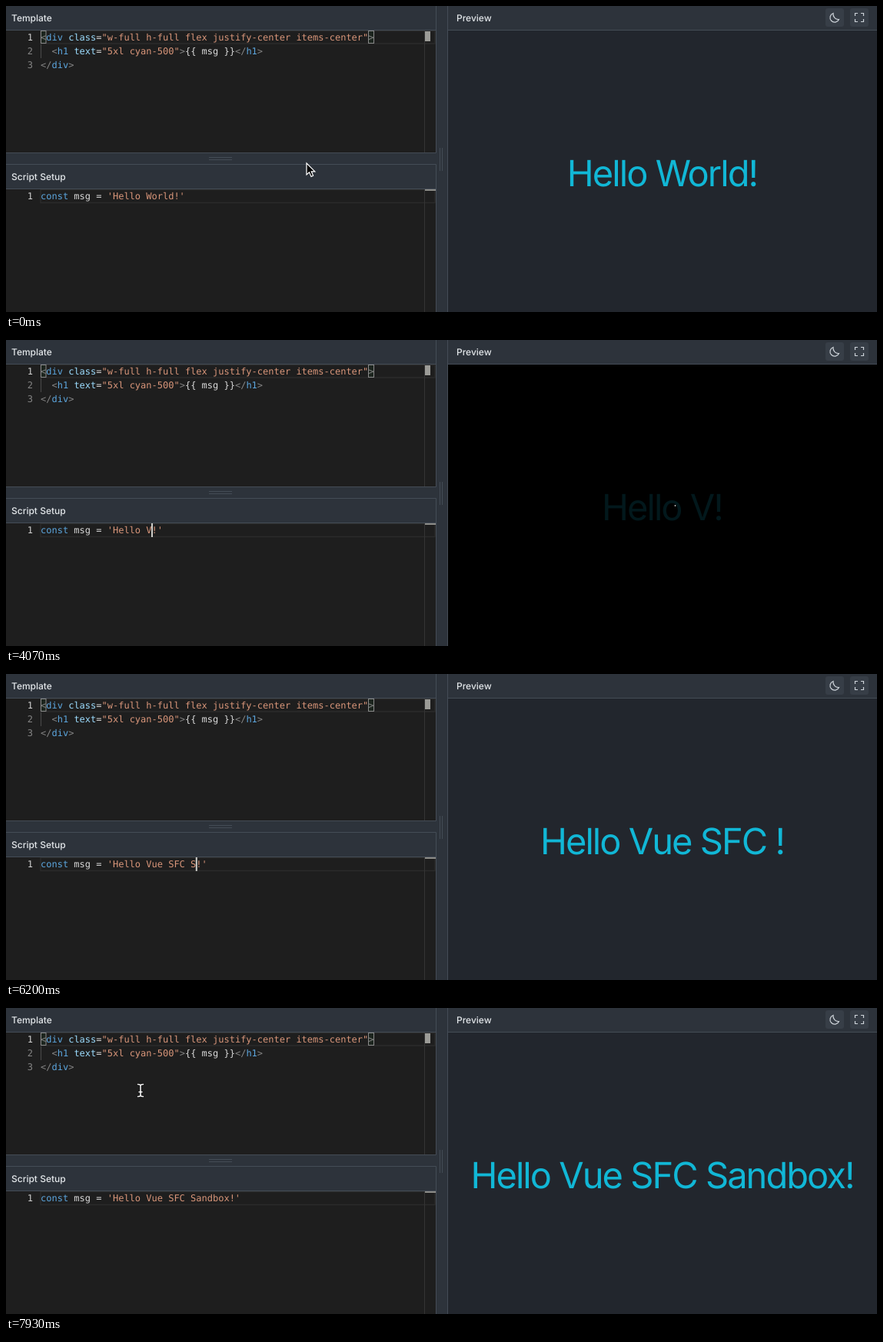
Animation of 1133x399 px, one loop 8000 ms. Source, as an HTML page:

```html
<!DOCTYPE html>
<html lang="en">
<head>
<meta charset="utf-8">
<title>Code playground</title>
<style>
html, body { margin: 0; width: 100%; height: 100%; overflow: hidden; background: #2d333b; }
svg { display: block; width: 100%; height: 100%; }
text { white-space: pre; text-rendering: geometricPrecision; }
.title { font: 500 12px Inter, Roboto, sans-serif; fill: #e3e7ea; }
.code { font: 12px "DejaVu Sans Mono", "Liberation Mono", monospace; fill: #dadada; }
.heading {
  font: 400 47px Inter, Roboto, sans-serif;
  font-optical-sizing: none;
  letter-spacing: -1.95px;
  text-anchor: middle;
  fill: #11b7d6;
}
.editor { fill: #1e1e1e; }
.lines { stroke: #444c56; fill: none; }
.current { fill: none; stroke: #2b2b2b; stroke-width: 1.5; }
.ruler { stroke: #343434; }
.mark { fill: #9b9b97; }
.bracket { fill: #1c251e; stroke: #8a8a8a; }
.num { fill: #858585; text-anchor: end; }
.num.on { fill: #d0d0d0; }
.p { fill: #858585; }
.k { fill: #5ca6de; }
.a { fill: #9cdcfe; }
.s { fill: #d9967a; }
.button { fill: #373e47; }
.icon { fill: none; stroke: #cdd3d9; stroke-width: 1.2; }
</style>
</head>
<body>
<svg viewBox="0 0 1133 399">
  <rect width="1133" height="399" fill="#2d333b"/>

  <!-- Template pane -->
  <rect class="editor" y="32" width="559" height="159"/>
  <rect class="current" x="45" y="32.5" width="513" height="16.5"/>
  <path class="ruler" d="M544.5 32V191M544.5 239V399"/>
  <path d="M45.5 50V68" stroke="#4a4a4a"/>
  <rect class="mark" x="545" y="33" width="7" height="13"/>
  <rect class="bracket" x="45.5" y="32.5" width="6.5" height="16"/>
  <rect class="bracket" x="471.5" y="32.5" width="7" height="16"/>
  <text class="title" x="7" y="20">Template</text>
  <g class="code">
    <text class="num on" x="35" y="45">1</text>
    <text class="num" x="35" y="63">2</text>
    <text class="num" x="35" y="81">3</text>
    <text x="45" y="45"><tspan class="p">&lt;</tspan><tspan class="k">div</tspan> <tspan class="a">class</tspan>=<tspan class="s">"w-full h-full flex justify-center items-center"</tspan><tspan class="p">&gt;</tspan></text>
    <text x="45" y="63">  <tspan class="p">&lt;</tspan><tspan class="k">h1</tspan> <tspan class="a">text</tspan>=<tspan class="s">"5xl cyan-500"</tspan><tspan class="p">&gt;</tspan>{{ msg }}<tspan class="p">&lt;/</tspan><tspan class="k">h1</tspan><tspan class="p">&gt;</tspan></text>
    <text x="45" y="81"><tspan class="p">&lt;/</tspan><tspan class="k">div</tspan><tspan class="p">&gt;</tspan></text>
  </g>

  <!-- Script pane -->
  <rect class="editor" y="239" width="559" height="160"/>
  <rect class="current" x="45" y="239.5" width="513" height="17"/>
  <path class="ruler" d="M544.5 239V399"/>
  <g id="highlight">
    <rect x="138.9" y="239" width="86.7" height="18" fill="#3b3f40"/>
    <rect class="mark" x="545" y="239" width="7" height="18"/>
  </g>
  <rect x="545" y="239" width="14" height="2" fill="#8c8c88"/>
  <text class="title" x="7" y="227">Script Setup</text>
  <g class="code">
    <text class="num on" x="35" y="252">1</text>
    <text x="45" y="252"><tspan class="k">const</tspan> msg = <tspan class="s" id="literal"></tspan></text>
  </g>
  <rect id="caret" y="239" width="2" height="18" fill="#cfcfca"/>

  <!-- Preview pane -->
  <rect x="575" y="32" width="558" height="367" fill="#22262d"/>
  <rect id="blackout" x="575" y="32" width="558" height="367"/>
  <text class="heading" id="heading" x="853.5" y="235"></text>
  <circle id="speck" cx="870.5" cy="216" r=".9" fill="#ccc"/>
  <text class="title" x="586" y="20">Preview</text>
  <rect class="button" x="1066" y="3" width="24" height="24" rx="3"/>
  <rect class="button" x="1098" y="3" width="24" height="24" rx="3"/>
  <path class="icon" d="M1076 9.5A6 6 0 1 0 1083.5 17.5A7 7 0 0 1 1076 9.5Z"/>
  <path class="icon" d="M1104.5 13V9.5H1108M1112 9.5H1115.5V13M1115.5 17V20.5H1112M1108 20.5H1104.5V17"/>

  <!-- Dividers and grips -->
  <path class="lines" d="M0 31.5H559M0 191.5H559.5V0M0 206.5H559.5V399M0 238.5H559M574.5 0V399M574 31.5H1133
    M264 197.5H294M264 200.5H294M564.5 185V215M567.5 185V215"/>

  <path id="arrow" d="M0 0V15L3.5 11.8L6 17.4L8.6 16.3L6.2 10.8H10.8Z" fill="#000" stroke="#fff" stroke-width="1.2"/>
  <g id="beam" fill="none" stroke-linecap="round">
    <path id="beamShape" d="M-3.5-8Q0-8 0-6Q0-8 3.5-8M0-6V6M-3.5 8Q0 8 0 6Q0 8 3.5 8M-2 2H2" stroke="#111" stroke-width="3"/>
    <use href="#beamShape" style="display:none"/>
    <path d="M-3.5-8Q0-8 0-6Q0-8 3.5-8M0-6V6M-3.5 8Q0 8 0 6Q0 8 3.5 8M-2 2H2" stroke="#fff" stroke-width="1.5"/>
  </g>
</svg>
<script>
// All times are in ticks, 15 per second.
const LOOP = 8000, RATE = 15 / 1000;
const CHAR = 7.224, CODE_X = 45, BLINK = 7;
const CLICK = 34, MARKED = 36, JUMP = 41, ERASE = 55, MOUSE_BACK = 114;
const typed = 'Vue SFC Sandbox';
const keys = [57, 64, 66, 70, 75, 78, 80, 87, 93, 96, 98, 101, 103, 105, 107];
const previews = [
  [0, 'World!'], [61, 'V!'], [74, 'Vue !'], [83, 'Vue SFC!'],
  [91, 'Vue SFC !'], [97, 'Vue SFC S!'], [109, 'Vue SFC Sandbox!']
];
const blackouts = [[61, 63], [91, 92]];
const mousePath = [
  [0, 391, 205], [5, 355, 271], [7, 338, 277], [9, 318, 262], [13, 314, 261],
  [23, 230, 262], [27, 230, 262], [28, 206, 251], [32, 206, 251], [35, 201.5, 253.5],
  [113, 201.5, 253.5], [114, 201.5, 242], [115, 202, 229.5], [118, 202, 229.5], [119, 175, 107.5]
];

const $ = id => document.getElementById(id);
const show = (id, on) => { $(id).style.display = on ? '' : 'none'; };
const setText = (id, value) => {
  if ($(id).textContent !== value) $(id).textContent = value;
};

function mouseAt(tick) {
  const next = mousePath.findIndex(p => p[0] > tick);
  if (next < 0) return mousePath.at(-1).slice(1);
  const [t0, x0, y0] = mousePath[next - 1], [t1, x1, y1] = mousePath[next];
  const f = (tick - t0) / (t1 - t0);
  return [x0 + (x1 - x0) * f, y0 + (y1 - y0) * f];
}

function drawEditor(tick) {
  const count = keys.filter(k => k <= tick).length;
  const word = tick < ERASE ? 'World' : typed.slice(0, count);
  setText('literal', `'Hello ${word}!'`);

  const column = tick < JUMP ? 22 : tick < ERASE ? 24 : 19 + count;
  const lastAction = [CLICK, JUMP, ERASE, ...keys].filter(k => k <= tick).at(-1);
  const lit = Math.floor((tick - lastAction) / BLINK) % 2 === 0;
  $('caret').setAttribute('x', CODE_X + CHAR * column - .5);
  show('caret', tick >= CLICK && lit);
  show('highlight', tick >= MARKED && tick < ERASE);
}

function drawPreview(tick) {
  setText('heading', 'Hello ' + previews.filter(p => p[0] <= tick).at(-1)[1]);
  const dark = blackouts.some(([from, to]) => tick >= from && tick < to);
  show('blackout', dark);
  show('speck', dark);
  $('heading').style.opacity = dark ? .13 : 1;
}

function drawMouse(tick) {
  const [x, y] = mouseAt(tick);
  const visible = tick < ERASE || tick >= MOUSE_BACK;
  const overText = y < 191 || y > 238;
  const beam = overText || tick >= MOUSE_BACK;
  for (const id of ['arrow', 'beam']) {
    $(id).setAttribute('transform', `translate(${x} ${y})`);
    show(id, visible && beam === (id === 'beam'));
  }
}

function draw() {
  const tick = Math.floor((performance.now() % LOOP) * RATE + .1);
  drawEditor(tick);
  drawPreview(tick);
  drawMouse(tick);
  requestAnimationFrame(draw);
}
draw();
</script>
</body>
</html>
```
